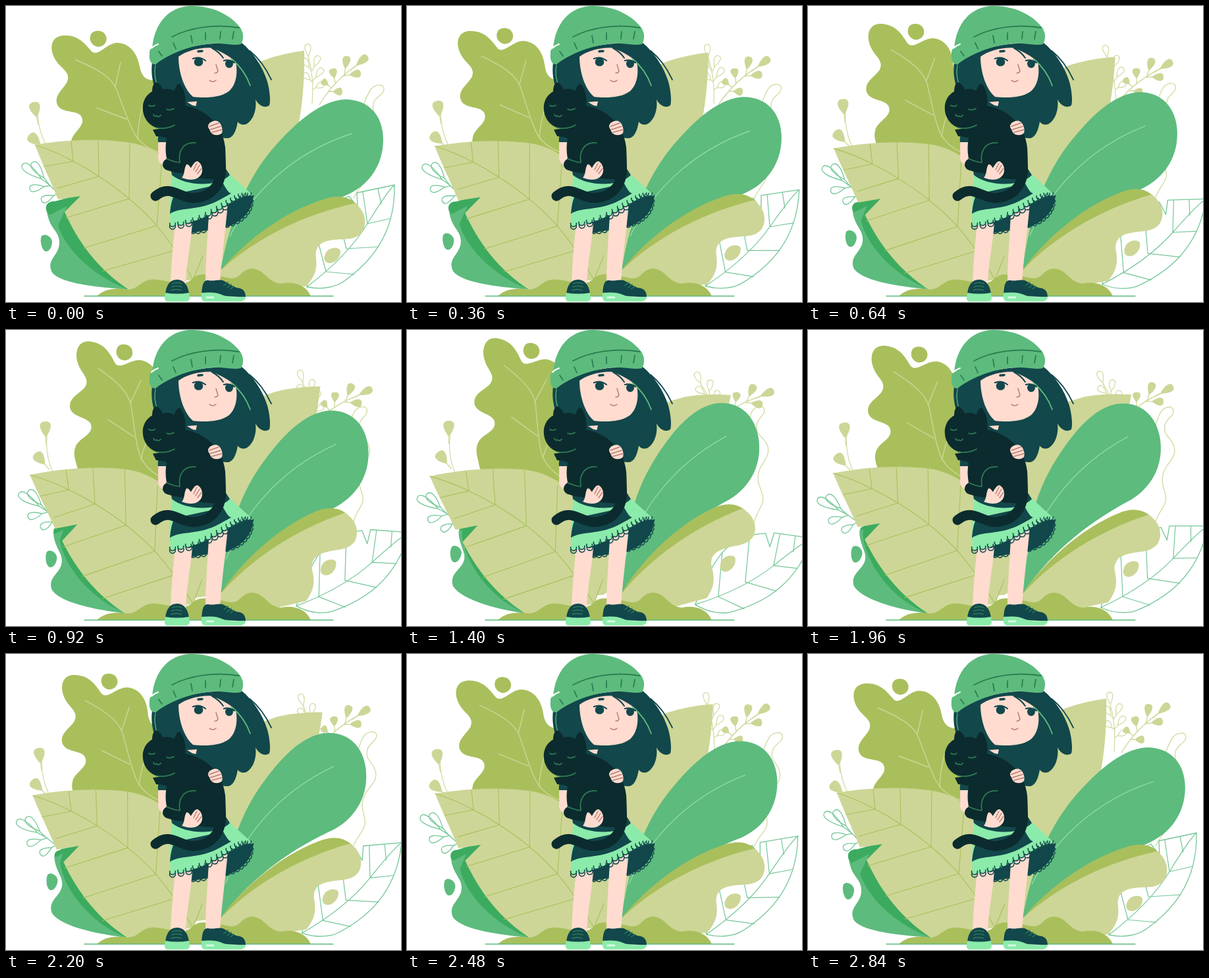
These frames come from a looping animation (600x450 px, 2880 ms). An HTML page with a canvas:

```html
<!DOCTYPE html>
<html lang="en">
<head>
<meta charset="utf-8">
<title>Girl with a cat</title>
<style>
  html, body { margin: 0; width: 100%; height: 100%; overflow: hidden; background: #fff; }
  canvas { display: block; width: 600px; height: 450px; }
</style>
</head>
<body>
<canvas id="stage" width="600" height="450"></canvas>
<script>
const ctx = document.getElementById('stage').getContext('2d');
const LOOP = 2880, STEP = 40;
const C = {
  olive: '#a9bf5c', pale: '#cdd696', paleLine: '#d5dca6', green: '#5dbb7d', deep: '#3cab5f',
  line: '#74c797', mint: '#8bebaa', teal: '#12474b', black: '#0c2b2e', skin: '#ffdccf',
  brown: '#b97c73', seam: '#2a7f50', catLine: '#2f7c55', vein: '#8bdba6'
};

const fill = (d, color) => { ctx.fillStyle = color; ctx.fill(new Path2D(d)); };
const stroke = (d, color, width = 1) => {
  ctx.strokeStyle = color;
  ctx.lineWidth = width;
  ctx.stroke(new Path2D(d));
};
const oval = (x, y, rx, ry, tilt, color) => {
  ctx.fillStyle = color;
  ctx.beginPath();
  ctx.ellipse(x, y, rx, ry, tilt, 0, Math.PI * 2);
  ctx.fill();
};

// Sine ease out to a peak time and back to rest.
const ease = x => (1 - Math.cos(Math.PI * x)) / 2;
const swing = (t, peak, end = LOOP) =>
  t < peak ? ease(t / peak) : t < end ? ease((end - t) / (end - peak)) : 0;

function turn(deg, x, y, draw) {
  ctx.save();
  ctx.translate(x, y);
  ctx.rotate(deg * Math.PI / 180);
  ctx.translate(-x, -y);
  draw();
  ctx.restore();
}

// Blend two paths that share the same commands.
function mix(a, b, k) {
  const to = b.match(/\d+/g);
  let i = 0;
  return a.replace(/\d+/g, n => +n + (to[i++] - n) * k);
}

// A stalk that ends in a teardrop leaf.
function drop(x, y, tx, ty, w, color, solid) {
  const dx = tx - x, dy = ty - y, len = Math.hypot(dx, dy);
  const nx = -dy / len * w, ny = dx / len * w;
  const sx = x + dx * 0.3, sy = y + dy * 0.3;
  const mx = x + dx * 0.72, my = y + dy * 0.72;
  const d = `M${sx} ${sy}C${mx + nx} ${my + ny} ${tx + nx} ${ty + ny} ${tx} ${ty}` +
    `C${tx - nx} ${ty - ny} ${mx - nx} ${my - ny} ${sx} ${sy}Z`;
  stroke(`M${x} ${y}L${sx} ${sy}`, color, 1.3);
  if (solid) fill(d, color); else stroke(d, color, 1.3);
}
const drops = (list, color, solid) => list.forEach(p => drop(...p, color, solid));

function backSprigs(t, early) {
  turn(-19 * swing(t, 1600), 468, 120, () => {
    stroke('M465 148Q468 105 459 78', C.paleLine, 1.3);
    drops([[460, 84, 458, 58, 6], [465, 99, 475, 76, 6], [464, 99, 451, 80, 6],
      [466, 114, 481, 95, 6], [466, 116, 452, 103, 6], [466, 127, 482, 118, 6]], C.paleLine);
  });
  turn(-10.6 * early, 530, 295, () => stroke(
    'M528 292C535 275 549 268 548 255C547 240 543 235 547 222C552 205 571 200 569 182' +
    'C566 163 553 165 559 146C563 136 575 135 574 125C572 118 560 119 554 127C548 136 546 143 541 155',
    C.paleLine, 1.4));
  turn(17.2 * early, 500, 112, () => {
    stroke('M476 150Q500 111 536 88', C.pale, 1.4);
    drops([[524, 97, 549, 76, 8], [514, 105, 518, 76, 8], [513, 106, 539, 102, 8],
      [500, 117, 496, 95, 8], [494, 124, 480, 113, 7], [490, 130, 511, 130, 8]], C.pale, true);
  });
  turn(11.5 * early, 93, 250, () => {
    stroke('M93 250C62 225 50 195 48 165', C.paleLine, 1.3);
    drops([[49, 180, 42, 146, 11], [60, 217, 35, 196, 11]], C.pale, true);
  });
  turn(-9.2 * swing(t, 1920), 118, 315, () => {
    stroke('M118 315Q85 293 66 272', C.line, 1.3);
    drops([[66, 272, 25, 241, 8], [65, 271, 40, 238, 8], [67, 273, 36, 278, 7],
      [80, 285, 54, 296, 7]], C.line);
  });
}

function outlinedLeaf(k) {
  turn(20 * k, 475, 367, () => {
    stroke('M457 427C480 432 500 427 511 420C550 393 592 350 590 272L533 284L534 306L521 289' +
      'C495 300 478 315 469 339C458 370 458 400 457 427', C.line, 1.3);
    stroke('M457 427Q519 380 549 331T590 272M486 404L469 339M517 369L499 299M549 331L542 283' +
      'M570 301L565 278M486 404L529 408M517 369L566 366M549 331L584 323', C.line, 1.2);
  });
}

function backLeaf(k) {
  turn(13 * k, 323, 270, () => fill(
    'M452 68C428 71 402 78 385 85L300 130L262 300L284 416L326 405C430 300 455 180 453 68Z', C.pale));
}

function oakLeaf(k) {
  turn(15.5 * k, 232, 222, () => {
    fill('M150 262L112 243C103 225 97 218 99 206C101 192 118 185 116 172C113 156 88 165 79 152' +
      'C71 137 86 128 93 115C99 100 83 95 76 83C66 68 66 48 85 45C108 43 118 55 130 69' +
      'C140 78 152 57 168 56C190 56 200 75 203 92C206 108 214 113 225 113L290 150L260 240Z', C.olive);
    fill('M129 43C133 36 147 36 151 44C156 53 149 62 140 62C131 61 125 52 129 43Z', C.olive);
    stroke('M106 82C140 96 160 108 168 127C176 148 184 172 193 190C203 210 220 219 236 223' +
      'M174 86L166 122M138 155L183 172M208 150Q200 180 200 203', C.pale, 1.4);
  });
}

function greenLeaf(k) {
  turn(-11.2 * k, 325, 402, () => {
    fill('M326 402C337 340 360 270 405 217C434 184 474 144 515 142C552 142 573 168 573 203' +
      'C573 242 551 274 514 289C455 308 385 340 326 402Z', C.green);
    stroke('M340 350C370 290 430 225 525 194', C.vein, 1.4);
  });
}

function lobedLeaf(k) {
  turn(-9 * k, 338, 420, () => {
    fill('M326 402C365 355 425 311 485 293C505 287 522 289 535 304L480 340L340 420Z', C.olive);
    fill('M326 402C380 352 455 316 530 300C546 311 550 332 540 345C528 358 510 353 495 356' +
      'C476 358 469 368 471 383C473 400 469 412 456 426L326 440Z', C.pale);
    fill('M486 375C491 366 506 366 508 372C509 382 500 391 491 391C483 390 481 383 486 375Z', C.pale);
  });
}

function cornerLeaf(k) {
  const dark = mix(
    'M64 316C57 306 62 296 74 297L118 285L130 330L186 431C130 425 80 380 80 340Z',
    'M82 310C81 308 80 303 82 300L116 285L130 330L182 431C130 425 88 380 88 340Z', k);
  const light = mix(
    'M66 318L93 304L79 334C90 368 130 410 186 431C150 428 85 424 70 405C60 384 82 380 81 358C80 340 66 340 62 312Z',
    'M82 303L83 303L84 308C86 350 126 410 182 431C150 427 85 412 70 388C63 366 89 362 88 342C87 334 79 320 80 305Z', k);
  fill(dark, C.deep);
  fill(light, C.green);
  turn(10.5 * k, 185, 425, () =>
    fill('M54 350C59 345 69 350 70 358C70 366 66 374 60 373C54 371 51 356 54 350Z', C.green));
}

function veinedLeaf(k) {
  turn(-2.7 * k, 284, 415, () => {
    fill('M44 211C95 202 150 202 190 208C235 216 275 250 285 300C295 350 296 390 284 416L186 431' +
      'C140 400 110 360 89 313L113 289L79 294C66 262 54 238 44 211Z', C.pale);
    stroke('M44 211Q75 221 102 236Q122 246 141 259Q166 275 187 293Q211 313 230 335Q260 372 284 416' +
      'M99 206L102 236L58 244M140 205L141 259L78 277M188 208L187 293L91 322' +
      'M237 235L229 334L118 368M255 372L147 403M284 416L299 380', C.olive, 1.1);
  });
}

function ground() {
  fill('M138 441C150 430 165 428 185 431C198 431 203 421 215 417C230 413 240 420 262 420' +
    'C285 424 280 408 300 408C330 408 342 420 354 410C364 399 374 396 386 403' +
    'C397 410 402 421 418 422C436 418 456 424 463 441Z', C.olive);
  stroke('M119 441H497', C.green, 1.3);
}

// Row of small arcs along a cubic hem.
function lace(p, count, r, color) {
  ctx.strokeStyle = color;
  ctx.lineWidth = 1.6;
  for (let i = 0; i <= count; i++) {
    const t = i / count, u = 1 - t;
    const at = j => u * u * u * p[j] + 3 * u * u * t * p[j + 2] + 3 * u * t * t * p[j + 4] + t * t * t * p[j + 6];
    ctx.beginPath();
    ctx.arc(at(0), at(1), r, -0.2, Math.PI + 0.2);
    ctx.stroke();
  }
}

function legsAndSkirt() {
  fill('M375 288C377 305 362 328 335 336L300 342L282 345L265 330L310 300Z', C.teal);
  lace([372, 296, 372, 312, 358, 328, 336, 333], 8, 3.6, C.teal);
  lace([284, 342, 291, 343, 300, 341, 309, 338], 3, 4, C.teal);
  fill('M257 330L283 330C281 360 274 390 273 424L250 424C251 390 254 360 257 330Z', C.skin);
  fill('M309 300L337 300C333 345 327 385 325 424L303 424C303 385 307 340 309 300Z', C.skin);

  fill('M253 255C280 270 320 268 340 256L375 288C345 288 315 328 250 335C248 310 250 280 253 255Z', C.mint);
  fill('M256 286L330 270C335 279 338 284 342 285C338 287 330 292 318 298C290 311 262 306 249 316' +
    'C250 304 252 294 256 286Z', C.teal);
  lace([371, 289, 345, 289, 315, 330, 253, 335], 14, 4.4, C.teal);
  lace([368, 285, 344, 284, 313, 325, 253, 331], 14, 4.4, C.teal);

  fill('M242 438C243 424 250 415 261 416C272 417 277 427 278 438Z', C.teal);
  fill('M242 436C254 438 266 438 278 436L279 445C278 448 276 449 273 449H246C242 449 241 447 241 444Z', C.mint);
  stroke('M253 422Q260 419 267 422M252 427Q260 424 267 427M251 432Q258 430 266 432', C.catLine, 1.5);
  fill('M297 438C298 426 299 416 307 417C315 419 323 415 329 417C340 422 345 428 355 429C362 431 364 436 364 443Z', C.teal);
  fill('M297 436C310 435 320 435 328 439C338 444 350 442 364 442C364 446 361 449 356 449H303C298 449 296 446 297 436Z', C.mint);
  stroke('M331 425L337 420M336 428L342 423M341 430L346 426', C.catLine, 1.5);
  stroke('M305 443H315', '#d9fbe3', 3);
}

function head() {
  // Hair behind the face
  fill('M222 86C245 66 300 54 358 56C375 70 390 92 397 115C401 130 402 145 400 151' +
    'C394 156 384 152 379 142C381 155 377 172 366 179C360 182 355 180 352 176C350 188 346 199 338 201' +
    'C325 202 310 192 300 180L270 160L228 130C222 116 220 100 222 86Z', C.teal);
  stroke('M370 68Q390 84 403 112M224 88Q221 104 227 120', C.teal, 1.8);
  stroke('M227 90Q224 105 230 121', C.green, 1.2);
  fill('M275 146L290 145L288 154Z', C.skin);
  fill('M262 77C275 67 300 62 313 64C324 68 340 76 349 85C353 105 348 122 338 130' +
    'C325 140 300 140 284 138C270 126 262 100 262 77Z', C.skin);
  stroke('M313 64Q324 70 330 79', C.teal, 2);
  stroke('M342 80Q362 96 371 121', C.green, 1.8);

  stroke('M292 69L298 68.5', C.teal, 3.4);
  stroke('M284 80Q294 76 303 83M331 83Q339 81 347 86', C.teal, 2.2);
  oval(292.5, 85, 6.8, 6.6, 0, C.teal);
  oval(339, 88, 6, 6.2, 0, C.teal);
  stroke('M319 89L322 99Q321 102 317 102M309 113Q314 117 319 113', C.brown, 1.5);

  // Hat
  fill('M222 64C225 27 247 0 282 0C316 0 344 15 358 36L340 48L235 68Z', C.green);
  fill('M218 72C217 65 224 61 232 57C265 40 310 30 354 33C361 37 362 50 357 58' +
    'C345 61 330 56 312 57C280 60 248 72 227 89C219 89 217 80 218 72Z', C.green);
  stroke('M252 47C280 32 320 27 354 33M232 69L237 76M254 56L258 65M281 45L283 56M303 41V51M326 39L325 50M346 39L344 50',
    C.seam, 1.8);
  stroke('M221 64Q225 60 231 58', '#fff', 2);
}

function bodyAndCat() {
  fill('M243 204C240 175 258 152 280 151C310 152 328 180 332 215L333 246L340 257C322 275 275 275 252 257Z', C.teal);
  fill('M232 203H243C242 215 243 225 246 240C238 244 231 239 231 230C232 220 230 212 232 203Z', C.skin);
  fill('M231 207C230 200 232 194 236 189L252 189L246 207Z', C.teal);
  fill('M223 188L254 184L250 203L238 199L228 198Z', C.black);

  stroke('M326 238C330 272 312 290 285 292C262 292 250 270 227 289', C.black, 15);
  fill('M256 150C296 150 329 176 333 215C334 232 334 245 333 256C325 264 316 264 308 263' +
    'C282 262 252 250 245 235C240 218 244 202 246 190Z', C.black);
  fill('M222 130C222 122 224 118 228 116C233 118 236 122 238 127C245 125 251 126 256 129' +
    'C257 123 260 119 264 118C271 126 274 140 272 152C268 175 252 187 236 187C216 184 206 168 208 150C210 140 215 134 222 130Z', C.black);
  stroke('M247 241Q262 246 276 246', C.black, 18);

  stroke('M217 151Q221 154 226 151M244 157Q250 159 255 156M224 165Q226 169 229 167Q232 170 235 166' +
    'M228 185Q244 188 256 181M244 232Q254 237 264 238C261 220 270 206 288 208', C.catLine, 1.7);

  fill('M267 261C272 256 270 247 274 241C278 240 279 245 281 246C284 241 287 236 291 236' +
    'C297 239 300 248 297 255C292 265 280 266 267 261Z', C.skin);
  stroke('M285 249L290 239M288 252L294 242M291 255L297 247', C.brown, 1.4);
  fill('M307 184C306 178 315 173 321 175C327 177 330 188 328 193C324 198 314 197 311 192Z', C.skin);
  stroke('M309 183L323 178M310 188L326 183M313 192L328 188', C.brown, 1.4);
}

function draw(t) {
  ctx.fillStyle = '#fff';
  ctx.fillRect(0, 0, 600, 450);
  ctx.lineCap = ctx.lineJoin = 'round';
  const early = swing(t, 1290, 2820), late = swing(t, 1720), mid = swing(t, 1370, 2840);
  backSprigs(t, early);
  outlinedLeaf(early);
  backLeaf(late);
  oakLeaf(early);
  greenLeaf(late);
  lobedLeaf(mid);
  cornerLeaf(late);
  veinedLeaf(early);
  ground();
  legsAndSkirt();
  head();
  bodyAndCat();
}

const start = performance.now();
function tick() {
  const t = (performance.now() - start) % LOOP;
  draw(Math.floor(t / STEP) * STEP);
  requestAnimationFrame(tick);
}
tick();
</script>
</body>
</html>
```
